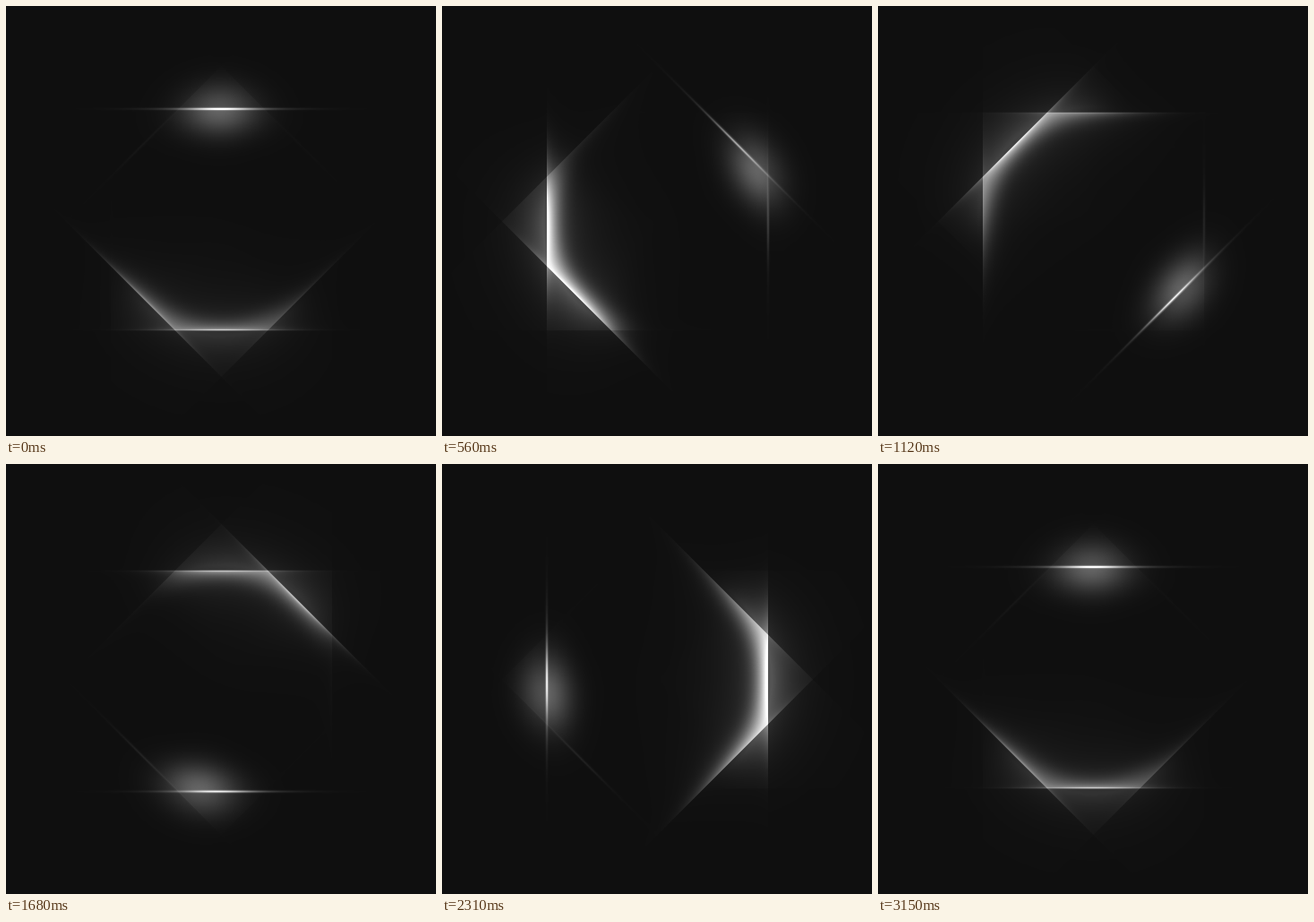
An HTML page with a canvas that plays this animation: 480x480 px, repeating every 3.22 s.

```html
<!DOCTYPE html>
<html>
<head>
<meta charset="utf-8">
<style>
html, body { margin: 0; height: 100%; overflow: hidden; background: #0f0f0f; }
canvas { display: block; }
</style>
</head>
<body>
<canvas id="stage" width="480" height="480"></canvas>
<script>
const SIZE = 480, STEP = 70, LOOP = 3220;
const RES = 4, HALF = 350, COUNT = 2 * HALF * RES;
const BASE = 15, CLEAR = 0.75;
const ctx = document.getElementById('stage').getContext('2d');
const image = ctx.createImageData(SIZE, SIZE);
const light = new Float32Array(SIZE * SIZE);
const veil = new Float32Array(SIZE * SIZE);

const rad = deg => deg * Math.PI / 180;
const bell = (x, width) => Math.exp(-((x / width) ** 2));
const flatBell = (x, width) => Math.exp(-((x / width) ** 4));
const wrap = deg => ((deg + 180) % 360 + 360) % 360 - 180;
const power = angle => 0.5 + 0.5 * Math.cos(rad(angle)) ** 2;

function table(f) {
  return Float32Array.from({ length: COUNT }, (_, i) => f(i / RES - HALF));
}
const slot = x => ((x + HALF) * RES + 0.5) | 0;

// Polar position of every pixel, as table slots
const radii = new Uint16Array(SIZE * SIZE), turns = new Uint16Array(SIZE * SIZE);
for (let p = 0; p < SIZE * SIZE; p++) {
  const dx = p % SIZE - SIZE / 2, dy = Math.floor(p / SIZE) - SIZE / 2;
  radii[p] = slot(Math.hypot(dx, dy));
  turns[p] = slot(Math.atan2(dy, dx) * 180 / Math.PI);
}
const arcAcross = table(r => r < 128
  ? 112 * bell(r - 128, 17) + 26 * Math.exp((r - 128) / 30)
  : 138 * Math.exp((128 - r) / 28));
const spotAcross = table(r => 85 * bell(r - 126, 28));

// Falloff along a side: broad glow and thin streak
const broad = table(v => bell(v, 62));
const streak = table(v => 0.7 * bell(v, 36) + 0.3 * bell(v, 75));

function addSide(side, angle) {
  const c = Math.cos(rad(side)), s = Math.sin(rad(side));
  const p1 = power(angle);
  const d1 = wrap(angle - side), d2 = wrap(angle + 180 - side);
  const wide = p1 * flatBell(d1, 50);
  const thin = bell(d2 - 13, 23);
  const radius = 121.7 + 1.8 * c * c + 4 * s * s * thin;
  const depth = 2.5 + 5.5 * p1 * (0.4 + 0.6 * c * c);
  const edge = 130 * (1 - p1) * bell(d1, 35);

  // Falloff across the side; r > 0 lies outside the octagon
  const across = f => table(u => {
    const r = u - radius;
    return f(r, Math.min(1, Math.max(0, 0.5 - r)));
  });
  const uVeil = across((r, inside) => CLEAR + (1 - CLEAR) * inside);
  const uBroad = across((r, inside) => wide * (
    inside * (135 * Math.exp(-Math.abs(r) / depth) + 30 * Math.exp(-Math.abs(r) / 30)) +
    (1 - inside) * 12 * Math.exp(-Math.abs(r) / 20)));
  const uStreak = across(r =>
    200 * thin * bell(r, 1.3) + edge * bell(r + 0.5, 1.1));

  for (let y = 0, p = 0; y < SIZE; y++) {
    const dy = y - SIZE / 2;
    for (let x = 0; x < SIZE; x++, p++) {
      const dx = x - SIZE / 2;
      const u = slot(dx * c + dy * s), v = slot(dy * c - dx * s);
      veil[p] *= uVeil[u];
      light[p] += uBroad[u] * broad[v] + uStreak[u] * streak[v];
    }
  }
}

function draw(n) {
  const angle = 100 + 8 * n;
  light.fill(BASE);
  veil.fill(1);
  for (let side = 0; side < 360; side += 45) addSide(side, angle);

  // A long arc and a small spot opposite, dimmed beyond each side
  const arcAlong = table(a => power(angle) * flatBell(wrap(a - angle + 4), 46));
  const spotAlong = table(a => bell(wrap(a - angle - 180 + 11), 19));
  const px = image.data;
  for (let p = 0, i = 0; p < light.length; p++, i += 4) {
    const r = radii[p], a = turns[p], k = veil[p];
    px[i] = px[i + 1] = px[i + 2] = light[p] +
      k * k * k * arcAcross[r] * arcAlong[a] + k * spotAcross[r] * spotAlong[a];
    px[i + 3] = 255;
  }
  ctx.putImageData(image, 0, 0);
}

let shown = -1;
function tick() {
  const n = Math.floor(performance.now() % LOOP / STEP);
  if (n !== shown) draw(shown = n);
  requestAnimationFrame(tick);
}
tick();
</script>
</body>
</html>
```
